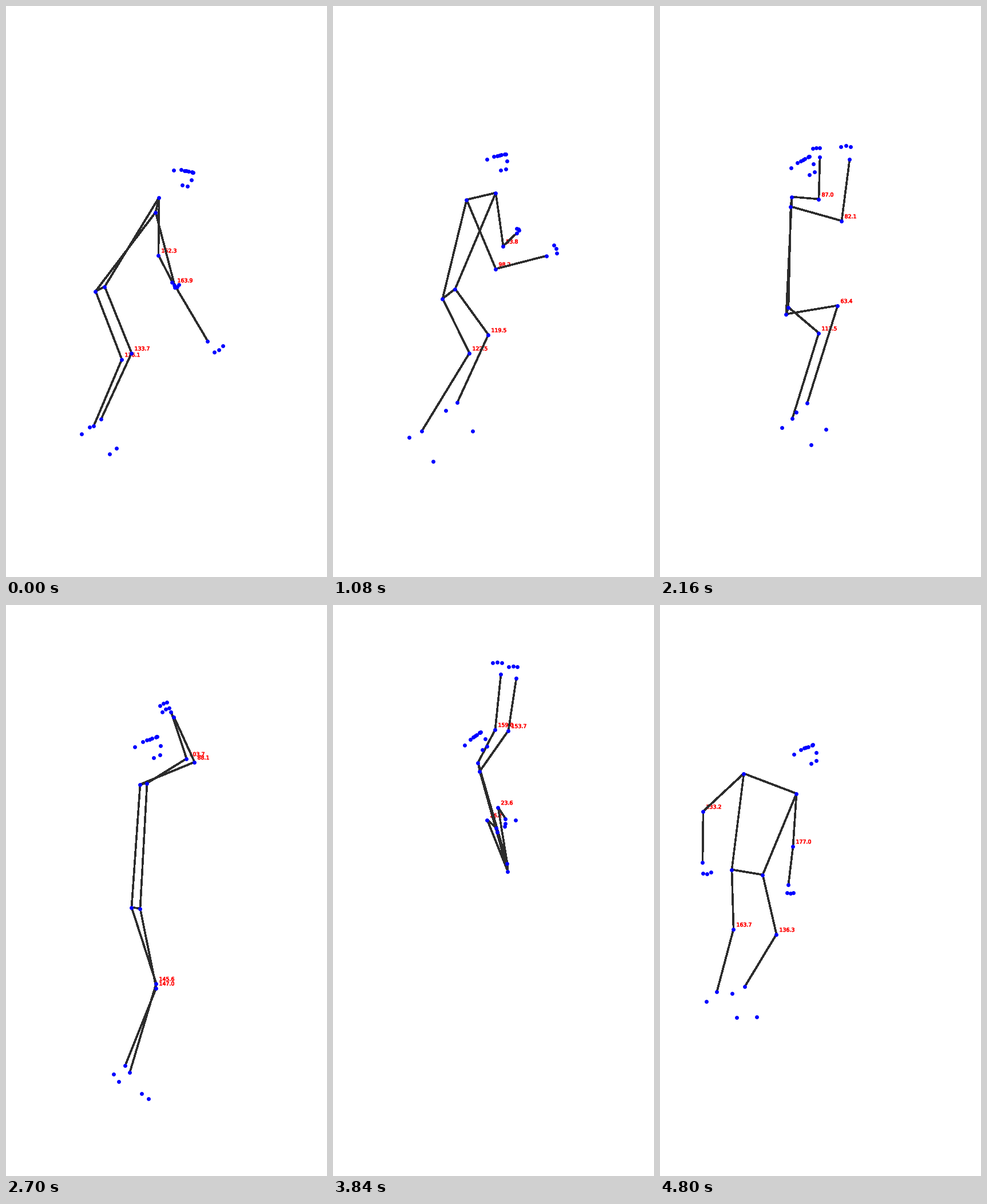
Animation, 561 px wide and 998 px high, one loop 4860 ms. Source, as a matplotlib script:

```python
import numpy as np
import matplotlib.pyplot as plt
from matplotlib import patheffects
from matplotlib.animation import FuncAnimation

W, H, DPI = 561, 998, 64
FRAMES, STEP = 81, 60
PT = 72 / DPI  # points per pixel
RED, BLUE, DARK = "#ff0000", "#0000ff", "#2c2c2c"


def turn(degrees):
    return np.exp(1j * np.radians(degrees))


# Points are complex numbers x + iy, with y pointing down.
EYES = [x - 13j for x in (0, -0.8, -1.6, -8, -11.5, -15)]
HEAD = np.array([0, *EYES, -21 - 13j, -34 - 10j, -4.5 + 12.5j, -14 + 13j])
FINGERS = 0.23 * np.array([1.1, 1, 0.9]) * turn(np.array([-42, -22, -2]))
FOOT = np.array([-19 + 16j, 32 + 47j]) * turn(-108)  # heel and toe, seen along the shin

poses = {}


def key(frame, head, *limbs):
    """Head: nose x, y, tilt, size. Limb: root x, y, joint x, y, bend, lower length.

    Limbs come as far arm, near arm, far leg, near leg.
    """
    poses[frame] = np.array(head, float), np.array(limbs, float)


def mix(a, b, u):
    return tuple(p * (1 - u) + q * u for p, q in zip(a, b))


def swap_legs(frame, body, legs, dx=0, dy=0):
    """Pose with the upper part of one pose and the moved legs of another."""
    limbs = np.vstack([body[1][:2], legs[1][2:]])
    limbs[2:, :4] += (dx, dy, dx, dy)
    poses[frame] = body[0], limbs


key(0, (324.5, 303, -12, 1),
    (267, 334, 266, 435, 152.3, 53), (261, 360, 294, 487, 163.9, 114),
    (172, 490, 219, 606, 133.7, 127), (156, 498, 202, 617, 136.1, 126))
key(11, (319, 282, 0, 1),
    (254, 344, 248, 433, 124.7, 40), (236, 347, 250, 474, 113.7, 96),
    (199, 501, 259, 598, 130.0, 127), (182, 518, 236, 637, 140.3, 161))
key(25, (292, 261, 21, 1),
    (312, 311, 342, 408, -10.3, 27), (231, 331, 315, 447, 84.1, 89),
    (306, 451, 353, 419, 50.3, 146), (253, 465, 254, 406, 4.3, 149))
key(36, (268, 275, 28, 1.1),
    (230, 333, 277, 337, 87.0, 74), (228, 350, 317, 375, 82.1, 108),
    (220, 538, 310, 523, 63.4, 178), (224, 526, 277, 571, 113.5, 156))
key(45, (270, 245, 19, 1.25),
    (246, 311, 315, 268, 103.7, 86), (234, 313, 329, 274, 88.1, 86),
    (234, 530, 262, 669, 147.0, 146), (219, 528, 262, 661, 145.6, 162))
key(64, (266, 233, 34, 1.05),
    (253, 275, 283, 217, 159.0, 97), (256, 290, 306, 219, 153.7, 93),
    (304, 451, 288, 353, 23.6, 25), (305, 465, 269, 375, 26.2, 22))
key(80, (273, 257, 22, 1.1),
    (238, 329, 232, 421, 183.0, 68), (146, 294, 75, 360, 133.2, 90),
    (179, 471, 203, 575, 136.3, 107), (125, 462, 128, 566, 163.7, 113))

# take-off, then a landing after each jump
swap_legs(19, mix(poses[11], poses[25], 0.6), mix(poses[11], poses[25], 0.15))
swap_legs(32, mix(poses[25], poses[36], 0.6), poses[45], -14, -4)
swap_legs(70, mix(poses[64], poses[80], 0.5), poses[45], -55, -21)
TIMES = sorted(poses)


def pose_at(frame):
    j = min(np.searchsorted(TIMES, frame, side="right"), len(TIMES) - 1)
    a, b = TIMES[j - 1], TIMES[j]
    return mix(poses[a], poses[b], (frame - a) / (b - a))


def hop(frame, start=45, end=64, height=95):
    """Rise of the high jump, a parabola over its airtime."""
    u = np.clip((frame - start) / (end - start), 0, 1)
    return 4 * height * u * (1 - u)


def solve(frame):
    """Return the three joints of each limb, all points and the joint angles."""
    (x, y, tilt, size), limbs = pose_at(frame)
    lift = -1j * hop(frame)
    points = list(x + 1j * y + lift + size * HEAD * turn(-tilt))
    chains = []
    for i, (rx, ry, jx, jy, bend, length) in enumerate(limbs):
        root, joint = rx + 1j * ry + lift, jx + 1j * jy + lift
        is_arm = i < 2
        upper = (root - joint) / abs(root - joint)
        lower = upper * turn(bend if is_arm else -bend)
        end = joint + length * lower
        chains.append((root, joint, end))
        tips = length * lower * FINGERS if is_arm else min(1, length / 80) * lower * FOOT
        points += [root, joint, end, *(end + tips)]
    angles = 180 - abs(180 - abs(limbs[:, 4]))
    return chains, points, angles


def pixels(points):
    """Snap to pixel centres."""
    z = np.array(points)
    return np.floor(z.real) + 0.5, np.floor(z.imag) + 0.5


fig = plt.figure(figsize=(W / DPI, H / DPI), dpi=DPI, facecolor="white")
ax = fig.add_axes([0, 0, 1, 1])
ax.set(xlim=(0, W), ylim=(H, 0))
ax.axis("off")

heavy = [patheffects.withStroke(linewidth=0.7 * PT, foreground=RED)]
labels = [ax.text(0, 0, "", color=RED, family="DejaVu Sans", size=9.4 * PT,
                  va="baseline", path_effects=heavy, zorder=1) for _ in range(4)]
bones = [ax.plot([], [], color=DARK, lw=2.6 * PT, antialiased=False,
                 solid_capstyle="round", zorder=2)[0] for _ in range(6)]
dots, = ax.plot([], [], "o", color=BLUE, ms=6.9 * PT, mew=0, antialiased=False, zorder=3)


def draw(frame):
    chains, points, angles = solve(frame)
    far_arm, near_arm, far_leg, near_leg = chains
    torso = [far_arm[0], near_arm[0], near_leg[0], far_leg[0], far_arm[0]]
    for line, path in zip(bones, [*chains, torso]):
        line.set_data(*pixels(path))
    dots.set_data(*pixels(points))
    for label, chain, angle in zip(labels, chains, angles):
        x, y = pixels(chain[1])
        label.set_position((x + 5, y - 4.5))
        label.set_text(f"{angle:.1f}")
    return [*labels, *bones, dots]


bones.pop().remove()  # four limbs and one torso
anim = FuncAnimation(fig, draw, frames=FRAMES, interval=STEP, repeat=True, repeat_delay=0)
plt.show()
```
